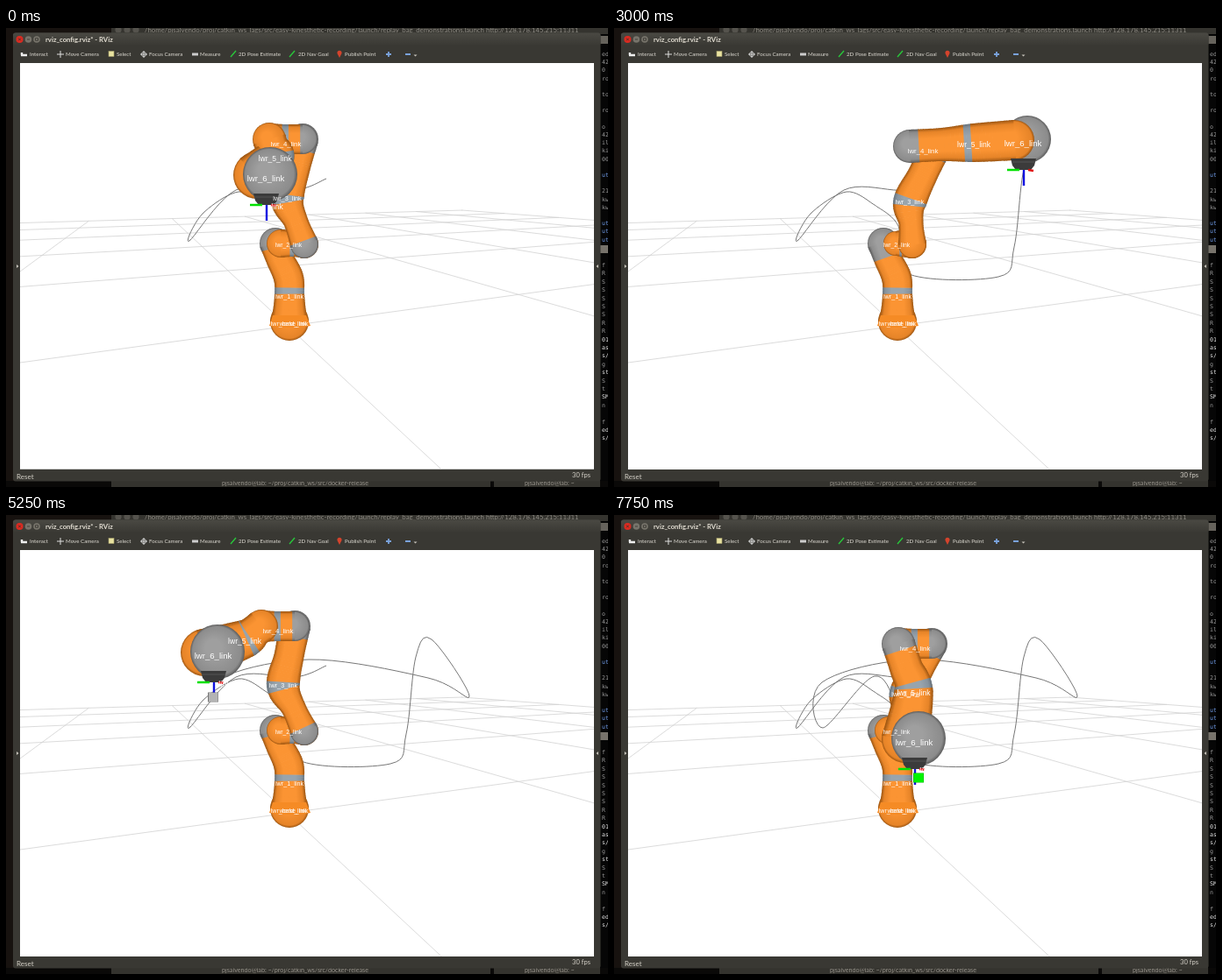
An HTML page with a canvas that plays this animation: 686 by 524 pixels, repeating every 8000 ms.

```html
<!DOCTYPE html>
<html lang="en">
<head>
<meta charset="utf-8">
<title>rviz_config.rviz* - RViz</title>
<style>
  html, body { margin: 0; width: 100%; height: 100%; overflow: hidden; background: #17120f; }
  #stage { position: relative; width: 686px; height: 524px; overflow: hidden; }
  svg, canvas { position: absolute; left: 0; top: 0; display: block; }
  text { font-family: Lato, sans-serif; white-space: pre; }
  .mono text { font-family: "DejaVu Sans Mono", monospace; font-size: 6.5px; fill: #9a9a9a; }
  .tools text { font-size: 6.2px; fill: #dedbd3; }
</style>
</head>
<body>
<div id="stage">
  <svg width="686" height="524" viewBox="0 0 686 524">
    <defs>
      <linearGradient id="bar" x2="0" y2="1">
        <stop offset="0" stop-color="#4a4943"/><stop offset="1" stop-color="#393833"/>
      </linearGradient>
    </defs>
    <rect width="686" height="524" fill="#17120f"/>
    <rect x="120" width="566" height="7" fill="#35342f"/>
    <g fill="#55534d"><circle cx="128" cy="2" r="3.6"/><circle cx="138" cy="2" r="3.6"/><circle cx="148" cy="2" r="3.6"/></g>
    <text x="158" y="4.5" font-size="7.8" fill="#8d8a83">/home/pjsalvendo/proj/catkin_ws_lags/src/easy-kinesthetic-recording/launch/replay_bag_demonstrations.launch http://128.178.145.215:11311</text>
    <rect x="677" y="7" width="9" height="517" fill="#060606"/>
    <g id="term" class="mono"></g>
    <rect x="677" y="9" width="9" height="9" fill="#66635c"/>
    <rect x="677" y="248" width="9" height="9" fill="#77736b"/>
    <rect y="517" width="686" height="7" fill="#0a0908"/>
    <rect x="120" y="516" width="432" height="8" fill="#34332e"/>
    <rect x="556" y="516" width="121" height="8" fill="#34332e"/>
    <text x="246" y="521.5" font-size="7.2" fill="#97938b">pjsalvendo@lab: ~/proj/catkin_ws/src/docker-release</text>
    <text x="591" y="521.5" font-size="7.2" fill="#97938b">pjsalvendo@lab: ~</text>
    <rect x="8" y="5.5" width="669.5" height="512" rx="3" fill="#393833"/>
    <rect x="8" y="5.5" width="669.5" height="15" rx="3" fill="url(#bar)"/>
    <circle cx="15.5" cy="13" r="4" fill="#de2a20"/>
    <g fill="#77746b"><circle cx="25.5" cy="13" r="3.8"/><circle cx="35" cy="13" r="3.8"/></g>
    <path d="M14 11.5l3 3m0-3l-3 3M24 13h3M33.5 11.7h3v2.6h-3z" fill="none" stroke="#35342f" stroke-width=".8"/>
    <text x="45" y="15.8" font-size="7.7" font-weight="700" fill="#e2ddd2">rviz_config.rviz* - RViz</text>
    <g class="tools" id="tools"></g>
    <g fill="none" stroke-width="1.4">
      <path d="M17 31h7M18 28v3" stroke="#eee" stroke-width="2.4"/>
      <path d="M58 30h8M62 26v8M153 30h8M157 26v8" stroke="#ddd" stroke-width="1"/>
      <circle cx="157" cy="30" r="2.6" stroke="#ddd" stroke-width=".8"/>
      <path d="M212 30h7" stroke="#ccc" stroke-width="3"/>
      <path d="M256 33l6-7M323 33l6-7" stroke="#28c63a"/>
      <path d="M433 30h6M436 27v6M455 30h6" stroke="#7aa2dc" stroke-width="1.8"/>
    </g>
    <rect x="117" y="26.5" width="6" height="6" fill="#e8e2a0" stroke="#a59f6a" stroke-width=".6"/>
    <path d="M380 34l-2.500-5a2.600 2.600 0 1 1 5 0z" fill="#d4432c"/>
    <path d="M464.500 30.500h4l-2 2zM12 270v4l2.500-2zM675 270v4l-2.500-2z" fill="#c8c4bb"/>
    <text x="12" y="514.5" font-size="8" fill="#d5d1c8">Reset</text>
    <text x="645" y="512.5" font-size="7.6" fill="#d5d1c8">30 fps</text>
  </svg>
  <canvas id="view" width="686" height="524"></canvas>
</div>
<script>
const LOOP = 8000, STEP = 250;
const SVG = 'http://www.w3.org/2000/svg';
const c = document.getElementById('view').getContext('2d');

function label(parent, x, y, s, fill) {
  const el = document.createElementNS(SVG, 'text');
  el.setAttribute('x', x);
  el.setAttribute('y', y);
  if (fill) el.style.fill = fill;
  el.textContent = s;
  document.getElementById(parent).append(el);
}
[[27, 'Interact'], [68, 'Move Camera'], [126, 'Select'], [163, 'Focus Camera'], [221, 'Measure'],
 [265, '2D Pose Estimate'], [333, '2D Nav Goal'], [386, 'Publish Point']]
  .forEach(([x, s]) => label('tools', x, 32.3, s));
'ed,42,0 d,rom,,to,,rom,,o e,42,ill,kit,005,,utk,,219,kw,kw,,utk,utk,utk'.split(',')
  .forEach((s, i) => label('term', 679, 32 + i * 9.2, s, s === 'utk' ? '#6f9be8' : ''));
'f,R,S,S,S,S,S,R,R,01,as,s/l,g,sta,S,t,SM,n,,f,ed,s/l'.split(',')
  .forEach((s, i) => label('term', 679, 273 + i * 9.4, s, s.length > 1 ? '#e8e8e8' : ''));

// Key points of the motion: time, tool x y, elbow x y
const keys = [
  [0, 297, 202, 319, 127],
  [500, 324, 226, 323, 134],
  [1150, 334, 280, 342, 147],
  [2000, 438, 284, 375, 147],
  [2400, 456, 250, 366, 142],
  [3000, 467, 162, 352, 135],
  [3250, 485, 142, 354, 136],
  [3750, 528, 207, 398, 164],
  [4250, 481, 186, 375, 153],
  [4750, 345, 165, 336, 130],
  [5250, 237, 191, 310, 127],
  [5750, 238, 243, 313, 132],
  [6750, 297, 184, 324, 121],
  [7250, 325, 228, 332, 133],
  [7750, 343, 290, 343, 147]
];
// Trail already drawn when the loop starts
const lead = smooth([[365, 172], [330, 185], [262, 185], [209, 243], [224, 212], [265, 187], [297, 202]], 10);

// Catmull-Rom between a and b for points of any dimension
function blend(p, a, b, q, u) {
  return a.map((v, d) => {
    const cubic = 3 * (v - b[d]) + q[d] - p[d];
    const square = 2 * p[d] - 5 * v + 4 * b[d] - q[d];
    return v + u / 2 * (b[d] - p[d] + u * (square + u * cubic));
  });
}

function segment(pts, i, u) {
  return blend(pts[Math.max(0, i - 1)], pts[i], pts[i + 1], pts[Math.min(pts.length - 1, i + 2)], u);
}

function smooth(pts, n) {
  const out = [];
  for (let k = 0; k < (pts.length - 1) * n; k++) out.push(segment(pts, Math.floor(k / n), k % n / n));
  return [...out, pts[pts.length - 1]];
}

function pose(t) {
  let i = 0;
  while (i < keys.length - 2 && keys[i + 1][0] <= t) i++;
  const u = (t - keys[i][0]) / (keys[i + 1][0] - keys[i][0]);
  return segment(keys, i, u).slice(1);
}

function line(pts, color, width) {
  c.strokeStyle = color;
  c.lineWidth = width;
  c.beginPath();
  pts.forEach(([x, y]) => c.lineTo(x, y));
  c.stroke();
}

function poly(pts, fill) {
  c.fillStyle = fill;
  c.beginPath();
  pts.forEach(([x, y]) => c.lineTo(x, y));
  c.fill();
}

// Edge, side and face of a rounded surface
const TONES = {
  orange: ['#9c5511', '#e68428', '#fb9433'],
  gray: ['#5c5c5c', '#8c8c8c', '#9f9f9f'],
  ring: ['#67727b', '#87939d', '#98a4ad']
};

function ball(x, y, r, tone) {
  const g = c.createRadialGradient(x - r * .15, y - r * .15, r * .3, x, y, r);
  const [edge, side, face] = TONES[tone];
  g.addColorStop(0, face);
  g.addColorStop(.85, side);
  g.addColorStop(1, edge);
  c.fillStyle = g;
  c.beginPath();
  c.arc(x, y, r, 0, 7);
  c.fill();
}

// A tapered tube; bands are [from, to, tone] along its length
function limb(pts, bands = []) {
  const s = smooth(pts, 14), n = s.length - 1;
  const tone = u => (bands.find(b => u >= b[0] && u <= b[1]) || [0, 0, 'orange'])[2];
  const cut = i => {
    const a = s[Math.max(0, i - 1)], b = s[Math.min(n, i + 1)];
    const f = Math.atan2(b[1] - a[1], b[0] - a[0]), dx = Math.cos(f), dy = Math.sin(f);
    const [x, y, r] = s[i];
    return { l: [x + dy * r, y - dx * r], r: [x - dy * r, y + dx * r], dx, dy };
  };
  ball(...s[0], tone(0));
  ball(...s[n], tone(1));
  for (let i = 0; i < n; i++) {
    const a = cut(i), b = cut(i + 1);
    const g = c.createLinearGradient(...a.l, ...a.r);
    const [edge, side, face] = TONES[tone((i + .5) / n)];
    [edge, side, face, face, side, edge].forEach((col, k) => g.addColorStop([0, .1, .3, .7, .9, 1][k], col));
    const over = p => [p[0] + b.dx * .7, p[1] + b.dy * .7];
    poly([a.l, over(b.l), over(b.r), a.r], g);
  }
}

function text(s, x, y, size) {
  c.font = size + 'px "Liberation Sans", Arial, sans-serif';
  c.fillText(s, x, y);
}

// Two fans of lines towards vanishing points on the horizon y = 180
function grid() {
  for (let k = -1; k <= 5; k++) {
    const x = 1493 - 1 / (.000767 + k * .000052), y = 222.97 - .0288 * x;
    const m = (y - 180) / (x - 149), end = x < 149 ? -200 : 900;
    line([[x, y], [end, y + m * (end - x)]], '#d2d2d2', .8);
  }
  for (let j = 0; j <= 5; j++) {
    const y = 180 + 1 / (.0235 - j * .00371), m = (180 - y) / 1477;
    const x = (168.74 - y + 16 * m) / (m - .0755);
    line([[16, y], [x, y + m * (x - 16)]], '#d2d2d2', .8);
  }
}

function cube(x, y, fill, edge) {
  c.fillStyle = edge;
  c.fillRect(x - 6, y - 5.5, 12, 11);
  c.fillStyle = fill;
  c.fillRect(x - 5, y - 5, 10.5, 10);
}

function tool(x, y) {
  poly([[x - 15, y - 13], [x + 14, y - 13], [x + 12, y - 5], [x + 8, y], [x - 9, y], [x - 13, y - 5]], '#3b3b3b');
  line([[x - 14, y - 9], [x + 13, y - 9]], '#555', 1);
  line([[x - 19, y], [x - 5, y]], '#00e000', 2.4);
  line([[x + 5, y], [x + 11, y + 1]], '#e01010', 2.4);
  line([[x, y], [x, y + 18]], '#1010e0', 2.4);
}

function robot([tx, ty, ex, ey]) {
  const near = tx < 390;            // forearm points at the viewer
  const turned = near && ty < 255;  // elbow shows its orange side
  const half = near ? 19 : 15, wr = near ? 31 : 27;
  const wx = tx + 4, wy = ty - 35;
  const ax = ex + half, bx = ex - half;
  const mx = (340 + ex) / 2 - 9, my = (247 + ey) / 2 + 8;
  const kx = (bx + wx) / 2 + 6, ky = (ey + wy) / 2;
  const mid = (x, y, r) => [(x + mx) / 2, (y + my) / 2, r];

  limb([[323, 335, 22], [323, 324, 19], [323, 305, 17], [322, 285, 17], [312, 263, 16], [307, 246, 18]],
    [[.42, .48, 'ring'], [near ? .93 : .82, 1, 'gray']]);
  poly([[300, 340], [304, 328], [342, 328], [347, 340], [335, 342], [312, 342]], '#f58b25');
  limb([[near ? 313 : 321, 246, near ? 16 : 14], [328, 246, 15], [340, 247, 16]], [[.35, .55, 'ring']]);
  limb([[340, 247, 16], mid(340, 247, 14), [mx, my, 19], mid(ax, ey, 17), [ax, ey, 18]],
    [[0, near ? .05 : -1, 'gray'], [.46, .53, 'ring'], [.9, 1, 'gray']]);
  limb([[ax, ey, 17], [ex, ey, 17], [bx, ey, 18]],
    [[0, .1, 'gray'], [.44, .6, 'ring'], [turned ? 2 : .9, 2, 'gray']]);

  if (near) ball(kx, ky, 22, 'orange');
  else ball(wx, wy, wr, 'gray');
  limb([[bx, ey, 19], [(bx + kx) / 2, (ey + ky) / 2, 19], [kx, ky, 22], [wx - 15, wy + 1, wr - 4]],
    [[0, turned ? -1 : .13, 'gray'], [.58, .64, 'ring']]);
  if (near) ball(wx, wy, wr, 'gray');
  tool(tx, ty);

  c.fillStyle = '#fff';
  text('lwr_base_link', 323, 338, 7);
  text('world_link', 327, 338, 7);
  text('lwr_1_link', 323, 307, 7.2);
  text('lwr_2_link', 322, 248, 6.8);
  text('lwr_3_link', mx, my, 7.3);
  text('lwr_4_link', ex, ey + 6, 7.8);
  text('lwr_5_link', kx, ky + 3, 8.5);
  text('lwr_6_link', wx - 5, wy + 5, 9.6);
  if (near) text('link', tx + 12, ty + 3, 9);
}

// The grasped object: gray at first, green on the last run
function cargo(t, [x, y]) {
  if (t >= 6000) cube(x + 4, y + 10, '#00f400', '#00b800');
  else if (t >= 4750) cube(x - 1, y + 17, '#b4b4b4', '#777');
  else if (t >= 3750) {
    cube(x - 17, y + 7, '#666', '#666');
    cube(x - 11, y + 6, '#b4b4b4', '#999');
  }
}

function draw(t) {
  const now = pose(t), trail = [...lead];
  for (let s = 0; s <= t; s += 50) trail.push(pose(s));
  c.fillStyle = '#fff';
  c.fillRect(16, 40, 654, 464);
  grid();
  line(trail, '#777', 1);
  robot(now);
  cargo(t, now);
}

c.textAlign = 'center';
c.textBaseline = 'middle';
c.lineJoin = 'round';
c.beginPath();
c.rect(16, 40, 654, 463.5);
c.clip();

const start = performance.now();
function tick() {
  const t = (performance.now() - start) % LOOP;
  draw(Math.floor(t / STEP) * STEP);
  requestAnimationFrame(tick);
}
tick();
</script>
</body>
</html>
```
